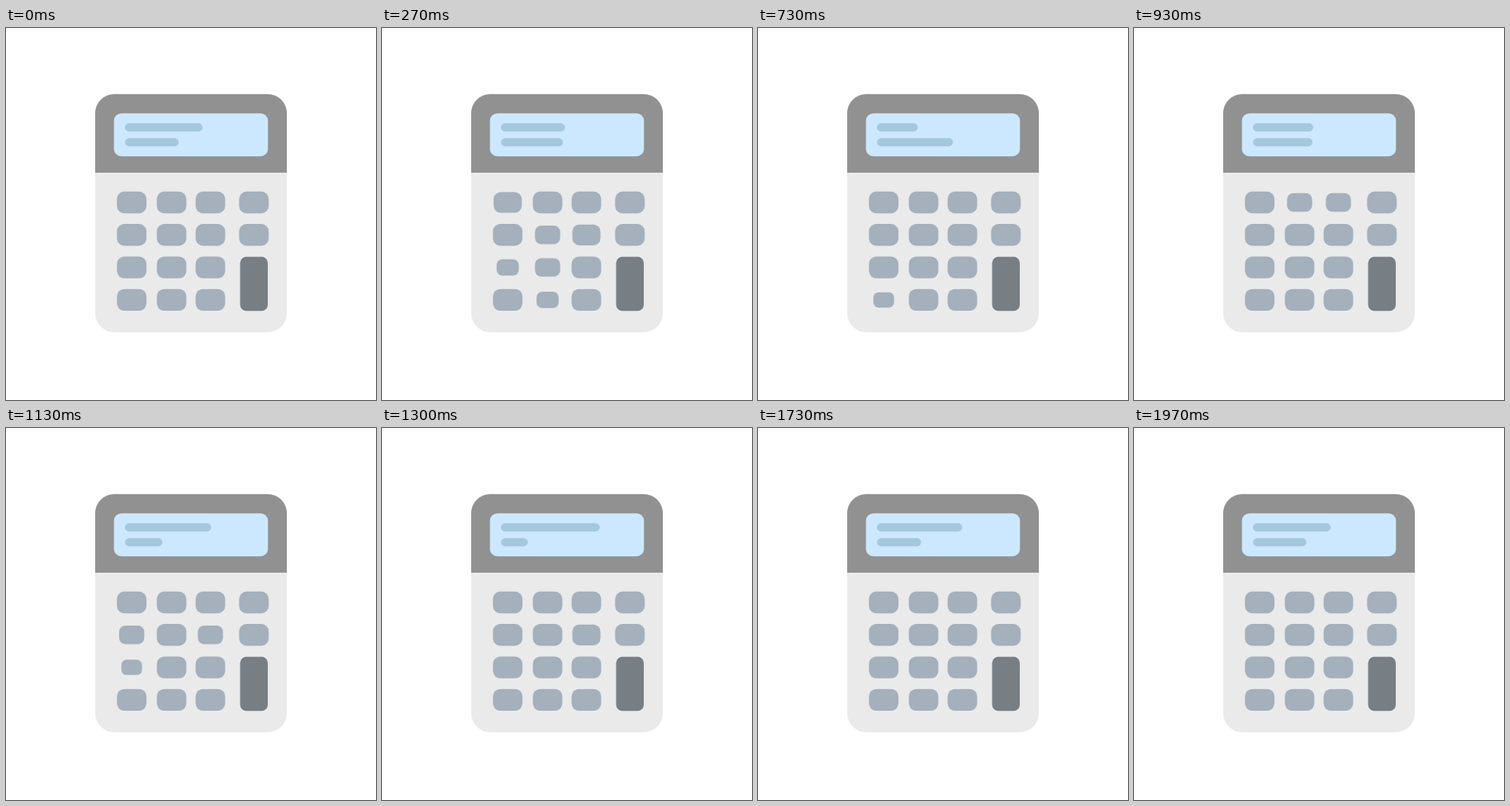
An HTML page with a canvas that plays this animation: 448x450 px, repeating every 2.03 s.

```html
<!DOCTYPE html>
<html>
<head>
<meta charset="utf-8">
<title>Calculator</title>
<style>
html, body { margin: 0; width: 100%; height: 100%; overflow: hidden; background: #fff; }
canvas { display: block; }
</style>
</head>
<body>
<canvas id="stage" width="448" height="450"></canvas>
<script>
const ctx = document.getElementById('stage').getContext('2d');
const LOOP = 2030, FRAME = 100 / 3;
const COLS = [152.2, 200.5, 247.5, 300.2], TOP_ROW = 211, ROW_GAP = 39.3;

// Bursts of typing: keys as hex digits counted row by row, first frame, frames between keys
const BURSTS = [
  { keys: '058', start: 1, gap: 1 },
  { keys: 'd96', start: 5, gap: 1 },
  { keys: '23a', start: 12, gap: 1 },
  { keys: 'c12', start: 18, gap: 4 },
  { keys: '486', start: 28, gap: 2 },
  { keys: 'e7c', start: 40, gap: 2 }
];

const ease = p => p * p * (3 - 2 * p);

function box(color, x, y, w, h, r) {
  ctx.fillStyle = color;
  ctx.beginPath();
  ctx.roundRect(x, y, w, h, r);
  ctx.fill();
}

// A display line whose right end eases through stops 20 frames apart
function line(y, stops, frame) {
  const i = Math.min(Math.floor(frame / 20), 2);
  const end = stops[i] + (stops[i + 1] - stops[i]) * ease(frame / 20 - i);
  box('#a4c8dc', 144, y, end - 144, 10, 5);
}

// A press shrinks the key for four frames and releases it for four
function keyScale(key, frame) {
  let depth = 0;
  for (const { keys, start, gap } of BURSTS) {
    const order = keys.indexOf(key.toString(16));
    const away = Math.abs(frame - start - order * gap - 4);
    if (order >= 0 && away < 4) depth = ease(1 - away / 4);
  }
  return 1 - 0.3 * depth;
}

function draw(frame) {
  ctx.fillStyle = '#fff';
  ctx.fillRect(0, 0, 448, 450);
  box('#eaeaea', 108, 80, 232, 288, 23);
  box('#919191', 108, 80, 232, 95, [23, 23, 0, 0]);
  box('#cce8ff', 130.7, 103.2, 186.5, 52, 9);
  line(115.2, [238, 191.4, 264.2, 238], frame);
  line(133.3, [209, 237.7, 176.1, 209], frame);
  box('#777e84', 283.5, 276.7, 33.5, 65.6, 7.5);
  for (let key = 0; key < 15; key++) {
    if (key === 11) continue; // the tall key stands here
    const x = COLS[key % 4], y = TOP_ROW + ROW_GAP * Math.floor(key / 4);
    const s = keyScale(key, frame);
    box('#a4b0bc', x - 17.9 * s, y - 13.2 * s, 35.8 * s, 26.4 * s, 9 * s);
  }
}

function tick() {
  const t = Math.floor(performance.now() % LOOP / 10) * 10;
  draw(Math.min(59, Math.floor((t + 5) / FRAME)));
  requestAnimationFrame(tick);
}
tick();
</script>
</body>
</html>
```
